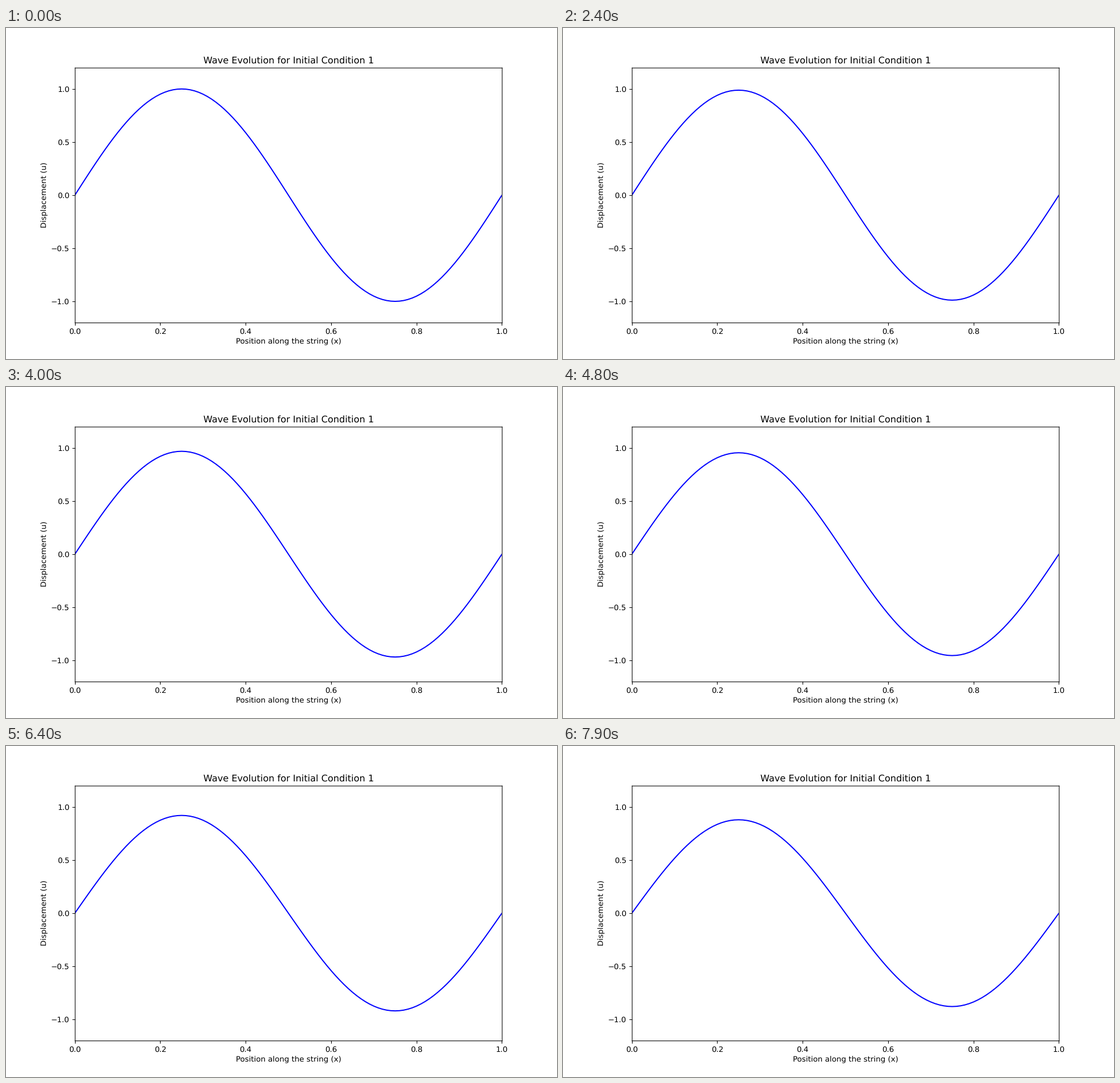
A matplotlib script for the animation above (8000 ms loop, 966 by 580 pixels).

```python
import numpy as np
import matplotlib.pyplot as plt
from matplotlib.animation import FuncAnimation
from matplotlib.patheffects import Stroke

FRAMES, INTERVAL = 80, 100
DT = 0.001          # simulated time per frame
WAVE_SPEED = 1.0

plt.rcParams["text.hinting"] = "none"

x = np.linspace(0, 1, 101)
mode = np.sin(2 * np.pi * x)

# 966 x 580 pixels
fig, ax = plt.subplots(figsize=(10, 6.00415), dpi=96.6)
line, = ax.plot(x, mode, color="blue", lw=1.5)
ax.set_xlim(0, 1)
ax.set_ylim(-1.2, 1.2)
ax.set_title("Wave Evolution for Initial Condition 1")
ax.set_xlabel("Position along the string (x)")
ax.set_ylabel("Displacement (u)")

# Soft border, half a pixel right of and below the axes edges.
for spine in ax.spines.values():
    spine.set_snap(False)
    spine.set_path_effects([Stroke(offset=(0.36, -0.36))])


def update(frame):
    """Standing wave: the second mode oscillates in place."""
    line.set_ydata(mode * np.cos(2 * np.pi * WAVE_SPEED * frame * DT))
    return line,


anim = FuncAnimation(fig, update, frames=FRAMES, interval=INTERVAL,
                     repeat=True, repeat_delay=0)
plt.show()
```
